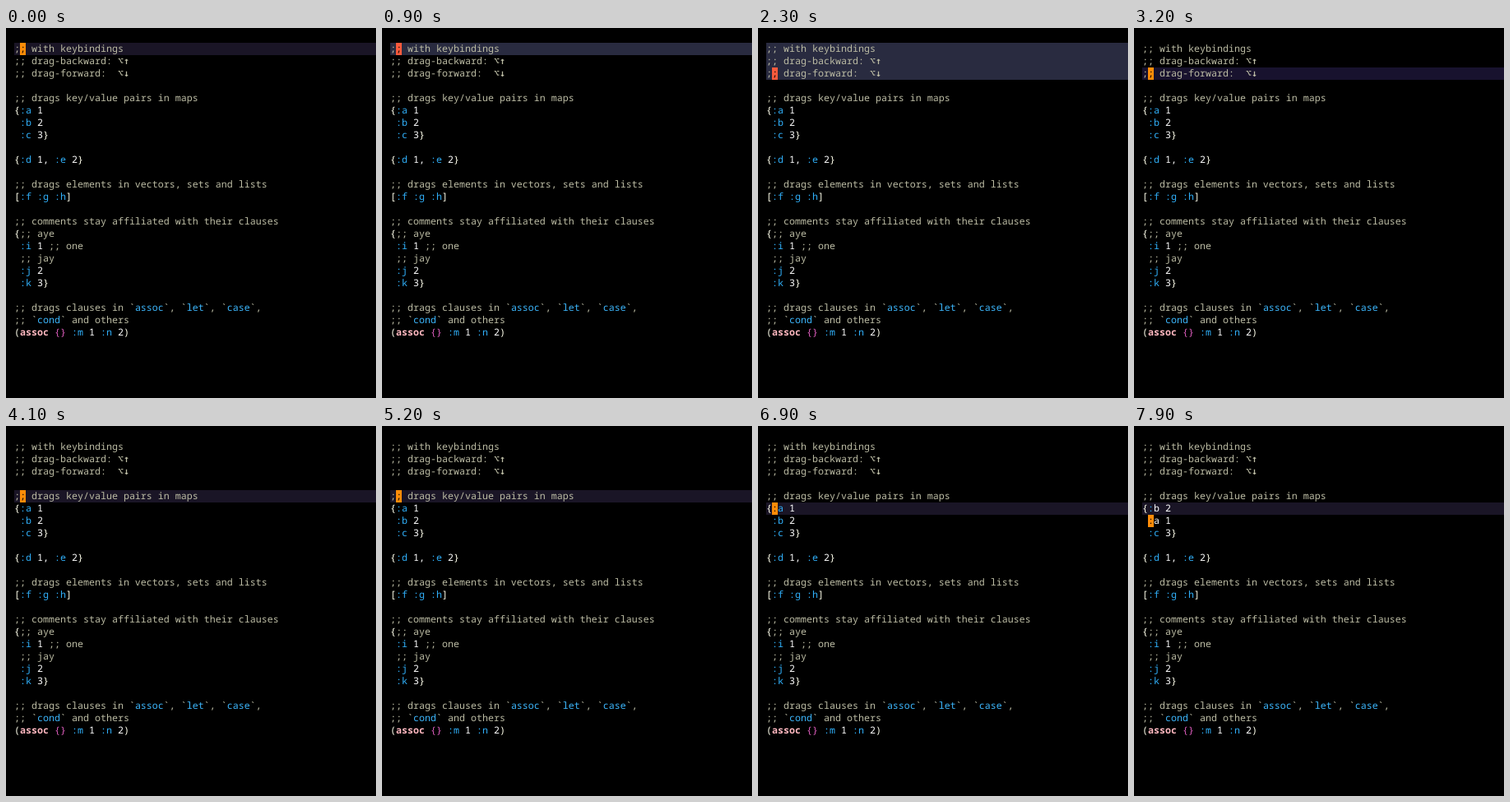
Write an HTML page that moves like this. It is 450x450 px and loops after 8000 ms.

```html
<!DOCTYPE html>
<html lang="en">
<head>
<meta charset="utf-8">
<title>Dragging clauses</title>
<style>
  html, body {
    margin: 0;
    width: 100%;
    height: 100%;
    overflow: hidden;
    background: #000;
  }
  #stage {
    position: absolute;
    width: 450px;
    height: 450px;
    overflow: hidden;
    background: #000;
  }
  pre, #cursor {
    margin: 0;
    position: absolute;
    font: 500 11.6667px/15px "Noto Sans Mono", "DejaVu Sans Mono", monospace;
    text-rendering: geometricPrecision;
    white-space: pre;
  }
  pre { left: 10px; top: 18px; color: #fff; }
  .pair { top: 93px; }

  .comment { color: #bcbca4; font-weight: 400; }
  .quoted { color: #3cb6fc; font-weight: 500; }
  .keyword { color: #30b0fa; }
  .bracket { color: #ffffec; }
  .call { color: #ffb8c0; font-weight: 600; }
  .empty { color: #dc5cbc; }
  .arrow {
    font-family: "DejaVu Sans Mono", monospace;
    font-weight: 600;
    line-height: 1;
  }
  .after .plain { color: #fff; }

  /* every change is a hard step on one shared 8 s clock */
  #band, #cursor, .pair { animation: 8s step-end infinite; }

  #band {
    position: absolute;
    left: 10px;
    width: 440px;
    animation-name: band, tint;
  }
  #cursor {
    width: 7px;
    height: 15px;
    color: #140a00;
    animation-name: cursor, heat;
  }
  #cursor::after {
    content: ";";
    animation: glyph 8s step-end infinite;
  }
  .before { animation-name: before; }
  .after { animation-name: after; }

  @keyframes band {
    0% { top: 18px; height: 15px; }
    21.2% { top: 18px; height: 30px; }
    24.9% { top: 18px; height: 45px; }
    33.7% { top: 48px; height: 15px; }
    43.7% { top: 63px; height: 15px; }
    46.2% { top: 78px; height: 15px; }
    83.7%, 100% { top: 93px; height: 15px; }
  }
  @keyframes tint {
    0% { background: #1a1526; }
    6.2% { background: #292b40; }
    33.7% { background: #18122e; }
    43.7%, 100% { background: #1a1526; }
  }
  @keyframes cursor {
    0% { left: 17px; top: 18px; }
    21.2% { left: 17px; top: 33px; }
    24.9% { left: 17px; top: 48px; }
    43.7% { left: 10px; top: 63px; }
    46.2% { left: 17px; top: 78px; }
    83.7% { left: 17px; top: 93px; }
    98.7%, 100% { left: 17px; top: 108px; }
  }
  @keyframes heat {
    0% { background: #ff8c08; }
    6.2% { background: #fa5a3c; }
    33.7%, 100% { background: #ff8c08; }
  }
  @keyframes glyph {
    0% { content: ";"; }
    43.7% { content: " "; }
    46.2% { content: ";"; }
    83.7%, 100% { content: ":"; }
  }
  @keyframes before {
    0% { visibility: visible; }
    98.7%, 100% { visibility: hidden; }
  }
  @keyframes after {
    0% { visibility: hidden; }
    98.7%, 100% { visibility: visible; }
  }
</style>
</head>
<body>
<div id="stage">
<div id="band"></div>
<pre>;; with keybindings
;; drag-backward: ⌥↑
;; drag-forward:  ⌥↓

;; drags key/value pairs in maps


 :c 3}

{:d 1, :e 2}

;; drags elements in vectors, sets and lists
[:f :g :h]

;; comments stay affiliated with their clauses
{;; aye
 :i 1 ;; one
 ;; jay
 :j 2
 :k 3}

;; drags clauses in `assoc`, `let`, `case`,
;; `cond` and others
(assoc {} :m 1 :n 2)</pre>
<pre class="pair before">{:a 1
 :b 2</pre>
<pre class="pair after">{:b 2
 :a 1</pre>
<div id="cursor"></div>
</div>
<script>
  const span = (name, text) => `<span class="${name}">${text}</span>`;

  const comment = text => span("comment", text
    .replace(/`(\w+)`/g, (_, word) => "`" + span("quoted", word) + "`")
    .replace(/[↑↓]/g, arrow => span("arrow", arrow)));

  const token = text => {
    if (text.startsWith(";;")) return comment(text);
    if (text === "assoc") return span("call", text);
    if (text === "{}") return span("empty", text);
    if (text[0] === ":") return span("keyword", ":" + span("plain", text[1]));
    return span("bracket", text);
  };

  for (const block of document.querySelectorAll("pre")) {
    block.innerHTML = block.textContent
      .replace(/;;.*|assoc|\{\}|:\w|[()[\]{}]/g, token);
  }
</script>
</body>
</html>
```
